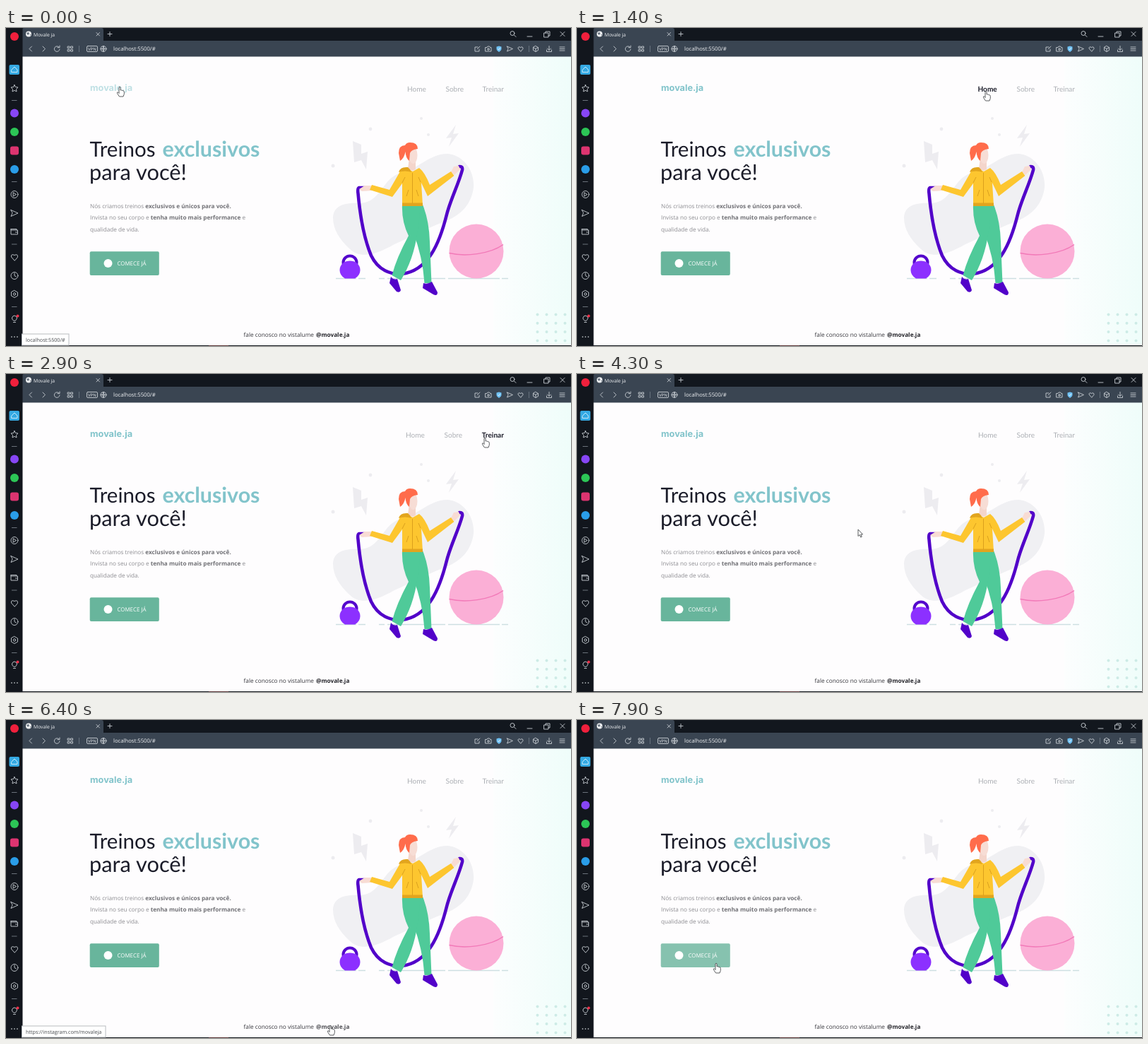
Animation, 800 px wide and 450 px high, one loop 8 s. Source, as an HTML page:

```html
<!DOCTYPE html>
<html lang="pt">
<head>
<meta charset="utf-8">
<title>Movale ja</title>
<style>
html, body { margin: 0; width: 100%; height: 100%; overflow: hidden; background: #fefdfe; }
svg { display: block; width: 800px; height: 450px; }
text { font-family: "Open Sans", "Noto Sans", sans-serif; white-space: pre; text-rendering: geometricPrecision; }
.lato { font-family: Lato, sans-serif; }
.b { font-weight: 700; }
.line { fill: none; stroke: #c8cdd3; stroke-width: .9; stroke-linecap: round; stroke-linejoin: round; }
.copy { font-size: 8.2px; fill: #8c8c91; }
.copy .b { fill: #717176; }
</style>
</head>
<body>
<svg viewBox="0 0 800 450">
  <defs>
    <linearGradient id="tint" x1="0" x2="1">
      <stop offset="0" stop-color="#fcfefe"/><stop offset="1" stop-color="#effdfa"/>
    </linearGradient>
  </defs>

  <!-- page -->
  <rect width="800" height="450" fill="#fefdfe"/>
  <rect x="690" y="40" width="110" height="410" fill="url(#tint)"/>
  <g id="dots" fill="#cdebe6"></g>

  <text id="logo" x="119" y="89" font-size="12.7" class="b" fill="#82c4cb" style="font-family:Inter,sans-serif">movale.ja</text>
  <text id="nav" x="705" y="90" font-size="10.1" class="lato" text-anchor="end" fill="#adb0b5"><tspan>Home</tspan><tspan dx="27.7">Sobre</tspan><tspan dx="27.7">Treinar</tspan></text>

  <g fill="#1b1c29">
    <text class="lato" x="118.5" y="182" font-size="29.5">Treinos</text>
    <text class="lato b" x="221.5" y="182" font-size="30.4" fill="#82c4cb">exclusivos</text>
    <text class="lato" x="118" y="215" font-size="30.8">para você!</text>
  </g>
  <g class="copy">
    <text x="119" y="255">Nós criamos treinos <tspan class="b">exclusivos e únicos para você.</tspan></text>
    <text x="119" y="271.3">Invista no seu corpo e <tspan class="b">tenha muito mais performance</tspan> e</text>
    <text x="119" y="287.6">qualidade de vida.</text>
  </g>
  <rect id="button" x="118.7" y="316.2" width="98.1" height="33.7" rx="2" fill="#68b59c"/>
  <circle cx="144.5" cy="333" r="6" fill="#fff"/>
  <text x="157.5" y="336" font-size="7.9" fill="#fff">COMECE JÁ</text>
  <g font-size="8.25" fill="#37373d">
    <text x="336.5" y="437">fale conosco no vistalume</text>
    <text id="handle" class="b" x="439" y="437" fill="#25252b">@movale.ja</text>
  </g>

  <!-- illustration -->
  <path fill="#f0f0f3" d="M463 268C464 250 482 247 500 248C530 248 532 215 556 206C580 203 598 178 625 178C650 180 664 205 662 226C658 254 640 267 618 275C590 286 575 295 550 306C520 323 500 326 486 312C472 299 463 285 463 268Z"/>
  <g fill="#edecf0">
    <path d="M491 160L503 165L503 178L512 175L510 200L503 187L493 190Z"/>
    <path d="M637 137L623 156L631 155L627 168L641 149L633 150Z"/>
    <circle cx="516" cy="143" r="2.4"/><circle cx="588" cy="128" r="2"/>
    <circle cx="463" cy="195" r="2.5"/><circle cx="598" cy="151" r="2"/>
  </g>
  <path stroke="#cddfe1" stroke-width="1.6" d="M467 354.500H496M499 354.500H509M528 354.500H536M540 354.500H622M626 354.500H699M702 354.500H711"/>
  <circle cx="666" cy="316" r="38.5" fill="#fbafd6"/>
  <path fill="none" stroke="#f279b8" stroke-width="1.5" d="M627.5 318.500C650 324 685 320 704 306.500"/>
  <circle cx="487" cy="332" r="9.5" fill="none" stroke="#5407cc" stroke-width="4"/>
  <path fill="#8c30ff" d="M480 354.500Q472.500 350 472.500 342.500C472.500 325 501.500 325 501.500 342.500Q501.500 350 494 354.500Z"/>

  <path fill="none" stroke="#5202c9" stroke-width="4.6" stroke-linecap="round" stroke-linejoin="round" d="M508 226H500Q497.500 227 498.500 234C501 262 507 298 517 322C527 343 545 349 560 348C598 344 614 304 624 264C629 244 641 220 646 201Q647 195.500 642 196"/>
  <path fill="#4fca99" d="M575 250H590Q599 272 600 302L602.500 361H592.500Q590 323 576 288Z"/>
  <path fill="#4fca99" d="M561 250H587Q585 274 582.500 290Q577 328 559 357L546.500 350Q553 325 570 294Q560 274 561 250Z"/>
  <path fill="#5202c9" d="M545 352Q549 357 554 355L559 371Q558 375 553 373L543 361Z"/>
  <path fill="#5202c9" d="M591 361Q597 363 603 359L611 374Q611 380 605 377L590 368Z"/>
  <path fill="#f8dcd4" d="M519 223L508 223L500 228L504 231L518 230ZM630 204L634 196L641 195L643 200L635 208Z"/>
  <path fill="#f4d5cb" d="M571 184H580V200Q575 204 569 199Z"/>
  <ellipse cx="576.5" cy="180" rx="6" ry="12" fill="#f7ddd5"/>
  <path fill="#ff6c4b" d="M583 171Q583 162 572 162Q567 162 565 166Q556 166 556 177L558 188Q564 184 565.500 175Q566 184 571 188L572 177Q574 172 583 171Z"/>
  <path fill="#fdc62f" d="M558 203L543 229L518 222L515 229L547 239L561 220L561 251H590L588 219L597 238L634.500 209L630 203L600 222Q593 204 585 198L576 203L566 198Z"/>
  <path fill="#e2a51e" d="M556 204Q558 196 569 197Q573 200 574 204Q565 201 556 204ZM561 247.500H590V252H561Z"/>
  <path fill="none" stroke="#d79c1c" stroke-width=".9" d="M575.500 205V248M567 238L570 229M581 229L584 238M561 219L565 211M587 218L584 211"/>

  <!-- browser -->
  <rect width="800" height="19" fill="#12171e"/>
  <path fill="#3a4552" d="M23 40.500V2Q23 0 26 0H135Q138 0 138 3V18H800V40.500Z"/>
  <rect width="23.500" height="450" fill="#12161d"/>
  <rect x="23" y="449" width="777" height="1" fill="#15191f"/>
  <rect x="287" y="449" width="28" height="1" fill="#5a3436"/>
  <circle cx="32" cy="8.500" r="4" fill="#eef0f2"/>
  <path fill="#65707c" d="M29 7L32 6L33 8L31 10ZM34 9L35.500 9L34 11Z"/>
  <text x="39" y="11.500" font-size="6.8" fill="#eef0f2">Movale ja</text>
  <text x="152" y="32" font-size="7.7" fill="#f1f3f5">localhost:5500/#</text>
  <rect class="line" x="114.500" y="25.500" width="15" height="8" rx="1.500"/>
  <text x="116" y="32" font-size="6" fill="#e8ebee">VPN</text>
  <path class="line" d="M128 6.500L132.500 11M132.500 6.500L128 11M144 8.500H150M147 5.500V11.500
    M36.500 26L33 29.500L36.500 33M52 26L55.500 29.500L52 33M75 27A3.800 3.800 0 1 0 76 30M76 25V27.700H73
    M87.500 26H90V28.500H87.500ZM92 26H94.500V28.500H92ZM87.500 30.500H90V33H87.500ZM92 30.500H94.500V33H92Z
    M134 29.500H142M138 25.500Q135.500 29.500 138 33.500Q140.500 29.500 138 25.500
    M719.500 10L722 12.500M738 12H745M762 7H768V13H762ZM764 7V5H770V11H768M785 5.500L791 11.500M791 5.500L785 11.500
    M668 27H664V33H670V30M667 30L671 26M679 27.500H681L682 26H684.500L685.500 27.500H687V33H679Z
    M709.500 26L717.500 29.500L709.500 33L711 29.500ZM728.500 33L725 29Q725 25.500 728.500 27.500Q732 25.500 732 29Z
    M750 25.500L753.500 27.500V31.500L750 33.500L746.500 31.500V27.500ZM746.500 27.500L750 29.500L753.500 27.500M750 29.500V33.500
    M769 25.500V31M766.500 29L769 31.500L771.500 29M765.500 31V33.500H772.500V31M784 27H791M784 29.500H791M784 32H791"/>
  <circle class="line" cx="717" cy="7.500" r="3"/><circle class="line" cx="138" cy="29.500" r="4"/><circle class="line" cx="683" cy="30" r="1.300"/>
  <path stroke="#66717d" d="M103.500 25V34M740.500 25V34"/>
  <path fill="#6fc1f4" d="M694.500 26.500L698 25.500L701.500 26.500V30Q701 32.500 698 34Q695 32.500 694.500 30Z"/>
  <path fill="none" stroke="#fff" d="M696.500 29.500L697.700 30.700L699.800 28.300"/>

  <circle cx="12" cy="12" r="6" fill="#f0203c"/>
  <rect x="4.500" y="52" width="14.500" height="14" rx="2" fill="#35a9e2"/>
  <path class="line" style="stroke:#d8f3ff" d="M8 59L12 55L16 59V62.500H8Z"/>
  <circle cx="12" cy="120.500" r="6" fill="#8746f5"/>
  <circle cx="12" cy="147" r="6" fill="#2cc556"/>
  <rect x="6" y="167.500" width="12" height="12" rx="3" fill="#dc3470"/>
  <circle cx="12" cy="200" r="6" fill="#2a9de8"/>
  <path class="line" d="M12 80.500L13.500 83.500L17 84L14.500 86.500L15 90L12 88.300L9 90L9.500 86.500L7 84L10.500 83.500Z
    M10.500 233L14.500 235.500L10.500 238ZM7 257.500L17 262L7 266.500L9 262ZM7 284.500H15V286M7 284.500V292H16.500V286H7M13.500 289H16
    M12 329L7.500 324Q7 319 12 321.500Q17 319 16.500 324ZM12 347V350.500L14.500 352
    M12 371.500L16.500 374V379L12 381.500L7.500 379V374ZM10.500 416.500H13.500M10.500 414Q8 412 8.500 410Q9.500 407 12 407Q15 407.500 15.500 410Q15.500 412 13.500 414Z"/>
  <circle class="line" cx="12" cy="235.500" r="5"/><circle class="line" cx="12" cy="350.500" r="5"/><circle class="line" cx="12" cy="376.500" r="1.700"/>
  <path stroke="#6b727b" d="M8 102.500H15.500M8 217.500H15.500M8 306H15.500M8 394.500H15.500"/>
  <circle cx="16.500" cy="407.500" r="2" fill="#f2304a"/>
  <path stroke="#d5d9de" stroke-width="1.7" stroke-linecap="round" d="M8 437H8.010M12 437H12.010M16 437H16.010"/>

  <g id="status">
    <rect id="bubble" x="22.500" y="433" width="66.500" height="16" fill="#fff" stroke="#b9bcc0"/>
    <text id="link" x="28" y="444" font-size="7.2" fill="#45484c"></text>
  </g>

  <g id="cursor" stroke="#4a4c50" stroke-width=".9" stroke-linejoin="round" fill="#fff">
    <path id="arrow" d="M0 0V9.500L2.200 7.500L3.700 11L5.300 10.300L3.800 7H6.600Z"/>
    <path id="hand" d="M-1 1Q0 -.8 1.100 1V5Q2.300 4.200 3.200 5.400Q4.300 4.800 5 6Q6.400 5.800 6.300 7.500V10.500L5 14H-.5L-3.500 9.500Q-4 7.500 -2.500 7.800L-1 9.500Z"/>
  </g>
</svg>
<script>
const LOOP = 8000, STEP = 100, LAG = 200;
const $ = id => document.getElementById(id);
const tabs = [...$("nav").children];

// pointer stops: time, x, y
const path = [
  [0, 161, 83], [300, 161, 83], [1400, 579, 89], [1800, 579, 89], [2100, 632, 90],
  [2500, 634, 90], [2900, 678, 90], [3800, 678, 90], [4300, 398, 220], [5000, 398, 220],
  [5700, 459, 432], [6800, 459, 432], [7300, 264, 392], [7600, 322, 378],
  [7700, 292, 272], [7800, 232, 298], [7900, 197, 344], [LOOP, 197, 344]
];

// hover areas: name, left, top, right, bottom
const areas = [
  ["logo", 119, 78, 180, 93], ["0", 566, 80, 594, 98], ["1", 620, 80, 646, 98],
  ["2", 673, 80, 705, 98], ["handle", 439, 427, 487, 442], ["button", 119, 316, 217, 350]
];

const local = { text: "localhost:5500/#", width: 66.5 };
const profile = { text: "https://instagram.com/movaleja", width: 118.5 };
const links = { logo: local, 0: local, 1: local, 2: local, handle: profile };

function pointer(t) {
  const i = path.findIndex(p => p[0] > t);
  const [t0, x0, y0] = path[i - 1], [t1, x1, y1] = path[i];
  const u = (t - t0) / (t1 - t0), s = u * u * (3 - 2 * u);
  return [x0 + (x1 - x0) * s, y0 + (y1 - y0) * s];
}

function hovered(t) {
  const [x, y] = pointer(t);
  const hit = areas.find(([, l, top, r, b]) => x >= l && x <= r && y >= top && y <= b);
  return hit ? hit[0] : "";
}

const show = (el, on) => el.setAttribute("visibility", on ? "visible" : "hidden");

function draw(t) {
  const [x, y] = pointer(t), name = hovered(t);
  $("cursor").setAttribute("transform", `translate(${x} ${y})`);
  show($("hand"), name);
  show($("arrow"), !name);

  $("logo").setAttribute("opacity", name === "logo" ? 0.5 : 1);
  $("handle").setAttribute("opacity", name === "handle" ? 0.8 : 1);
  $("button").setAttribute("opacity", name === "button" ? 0.8 : 1);
  tabs.forEach((tab, i) => {
    const on = name === String(i);
    tab.style.fontWeight = on ? 700 : 400;
    tab.style.fill = on ? "#1b1c29" : "";
  });

  const link = links[hovered(Math.max(0, t - LAG))];
  show($("status"), link);
  if (link) {
    $("link").textContent = link.text;
    $("bubble").setAttribute("width", link.width);
  }
}

for (let i = 0; i < 16; i++) {
  const dot = document.createElementNS("http://www.w3.org/2000/svg", "circle");
  dot.setAttribute("cx", 752.5 + (i % 4) * 13);
  dot.setAttribute("cy", 405.5 + Math.floor(i / 4) * 12.3);
  dot.setAttribute("r", 2);
  $("dots").append(dot);
}

const start = performance.now();
function tick() {
  const t = (performance.now() - start) % LOOP;
  draw(Math.floor(t / STEP) * STEP);
  requestAnimationFrame(tick);
}
tick();
</script>
</body>
</html>
```
